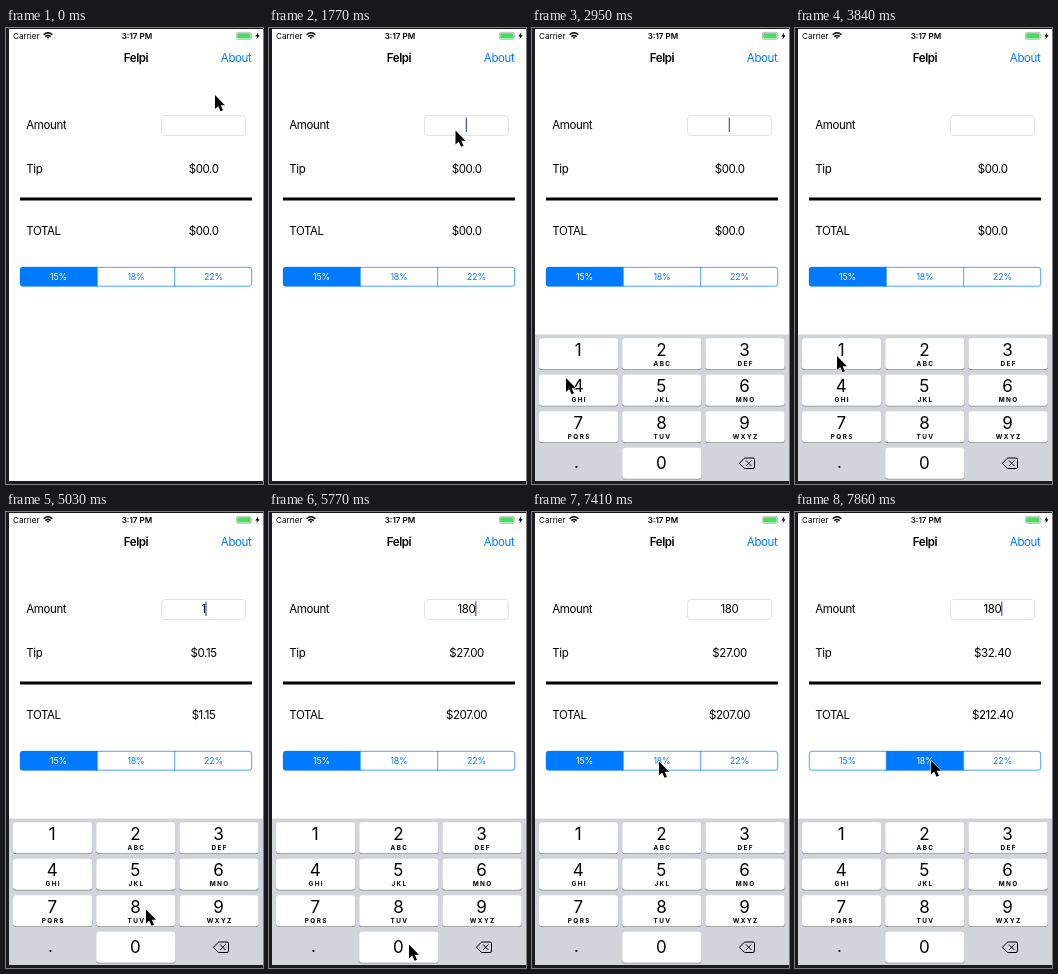
An HTML page for the animation above (8 s loop, 257 by 456 pixels).

```html
<!DOCTYPE html>
<html lang="en">
<head>
<meta charset="utf-8">
<title>Tip calculator</title>
<style>
  html, body { margin: 0; width: 100%; height: 100%; overflow: hidden; background: #1b1b1d; }
  svg { display: block; width: 100vw; height: 100vh; }
  text { font: 11.5px Inter, Roboto, sans-serif; letter-spacing: -.4px; fill: #000; }
  .mid { text-anchor: middle; }
  .status { font-size: 8.1px; letter-spacing: 0; }
  .bold { font-weight: 600; }
  .link { fill: #007aff; text-anchor: end; }
  .seg { font-size: 8.8px; letter-spacing: -.2px; text-anchor: middle; }
  .digit { font-size: 17px; letter-spacing: 0; text-anchor: middle; }
  .letters { font-size: 6.4px; font-weight: 700; letter-spacing: 1.4px; text-anchor: middle; }
</style>
</head>
<body>
<svg viewBox="0 0 257 456" preserveAspectRatio="none">
  <defs>
    <clipPath id="screen"><rect x="3" y="1" width="254" height="452"/></clipPath>
    <clipPath id="segClip"><rect x="14" y="239" width="232" height="19.5" rx="2.7"/></clipPath>
  </defs>
  <g clip-path="url(#screen)">
    <rect x="3" y="1" width="254" height="452" fill="#fff"/>

    <text class="status" x="7" y="11">Carrier</text>
    <g fill="none" stroke="#000" stroke-width="1.5">
      <path d="M37.6 6.7Q42 2.900 46.400 6.700M39.300 8.600Q42 6.300 44.700 8.600"/>
      <path d="M40.700 9.500L42 11L43.300 9.500Q42 8.500 40.700 9.500Z" fill="#000" stroke="none"/>
    </g>
    <text class="status bold mid" x="131" y="11">3:17 PM</text>
    <rect x="230.400" y="4.400" width="15" height="7" rx="1.500" fill="#fff" stroke="#999" stroke-width=".6"/>
    <rect x="231.200" y="5.200" width="13.400" height="5.400" rx=".8" fill="#4cd964"/>
    <path d="M246.300 6.600Q247.300 7.900 246.300 9.200Z" fill="#999"/>
    <path d="M252.300 4.300L249.300 8.500H251.200L250.500 11.500L253.600 7.200H251.700Z"/>

    <text class="bold mid" x="130" y="34">Felpi</text>
    <text class="link" x="245.300" y="34">About</text>

    <text x="20.300" y="101.200">Amount</text>
    <text x="20.300" y="145.200">Tip</text>
    <text x="20.300" y="207">TOTAL</text>
    <rect x="155.500" y="87.500" width="84" height="20" rx="3.500" fill="#fff" stroke="#dcdcdc" stroke-width=".8"/>
    <text id="amount" class="mid" x="197.500" y="101.200"></text>
    <rect id="caret" y="89.500" width="1.300" height="14.500" fill="#4a5fd0"/>
    <text id="tip" class="mid" x="197.600" y="144.600"></text>
    <text id="total" class="mid" x="197.600" y="207"></text>
    <rect x="14" y="169.500" width="232" height="3"/>

    <g clip-path="url(#segClip)" id="segments"></g>
    <path d="M91.300 239V258.500M168.700 239V258.500" stroke="#007aff" stroke-width=".7"/>
    <rect x="14.300" y="239.300" width="231.400" height="18.900" rx="2.600" fill="none" stroke="#007aff" stroke-width=".7"/>

    <g id="keyboard">
      <rect x="3" y="306.500" width="254" height="147" fill="#d1d5db"/>
      <g id="keys"></g>
      <text class="digit" x="44.500" y="439.500">.</text>
      <g fill="none" stroke="#000" stroke-width="1">
        <path d="M207.400 435.300L212 430.500Q212.500 430 213.200 430H221Q222.500 430 222.500 431.500V439Q222.500 440.500 221 440.500H213.200Q212.500 440.500 212 440Z"/>
        <path d="M214 432.500L219.400 438M219.400 432.500L214 438"/>
      </g>
    </g>
  </g>
  <path id="cursor" d="M0 0V14L3.200 11.100L5.500 16.300L8 15.200L5.700 10.200H10Z" stroke="#fff" stroke-width="1" paint-order="stroke"/>
</svg>
<script>
const LOOP = 8000, STEP = 148.2, LAST = 53;
const $ = id => document.getElementById(id);

function add(parent, tag, attrs, label) {
  const el = document.createElementNS('http://www.w3.org/2000/svg', tag);
  for (const name in attrs) el.setAttribute(name, attrs[name]);
  if (label) el.textContent = label;
  return parent.appendChild(el);
}

const segments = [15, 18, 22].map((rate, i) => ({
  rate,
  box: add($('segments'), 'rect', { x: 14 + i * 77.33, y: 239, width: 77.33, height: 19.5 }),
  label: add($('segments'), 'text', { class: 'seg', x: 52.5 + i * 77.5, y: 252 }, rate + '%')
}));

const LETTERS = ['', 'ABC', 'DEF', 'GHI', 'JKL', 'MNO', 'PQRS', 'TUV', 'WXYZ'];
const keys = {};
function addKey(digit, col, row, letters) {
  const x = 7 + col * 83.2, y = 310.3 + row * 36.5, size = { x, width: 79.2, height: 31, rx: 3.2 };
  add($('keys'), 'rect', { ...size, y: y + .8, fill: '#898c91' });
  keys[digit] = add($('keys'), 'rect', { ...size, y });
  const cx = x + 39.6;
  add($('keys'), 'text', { class: 'digit', x: cx - .4, y: y + (digit ? 17.3 : 21.4) }, String(digit));
  if (letters) add($('keys'), 'text', { class: 'letters', x: cx + .7, y: y + 27.2 }, letters);
}
LETTERS.forEach((letters, i) => addKey(i + 1, i % 3, Math.floor(i / 3), letters));
addKey(0, 1, 3);

// Pointer stops: [step, x, y]
const PATH = [
  [0, 209, 67], [1, 205, 71], [2, 193, 85], [3, 186, 94], [7, 186, 94], [8, 185.5, 101],
  [10, 186, 105], [12, 186.5, 102.5], [15, 186.5, 102.5], [17, 120, 225], [19, 34, 350], [20, 27, 360.5],
  [23, 27, 357], [25, 42, 328], [30, 45, 326], [31, 114, 438], [32, 136, 408], [34, 140, 397.5],
  [35, 140, 397.5], [36, 140, 432.5], [41, 140, 432.5], [43, 138, 370], [45, 129, 258],
  [46, 127, 249], [50, 127, 249.5], [51, 131, 250], [52, 136, 248.5], [53, 136, 248.5]
];
const CARET_TOGGLES = [5, 8, 11, 15, 18, 22, 26, 29, 31, 41, 44, 47, 51];

function pointerAt(step) {
  const i = Math.max(1, PATH.findIndex(p => p[0] >= step));
  const [s0, x0, y0] = PATH[i - 1], [s1, x1, y1] = PATH[i];
  const u = (step - s0) / (s1 - s0);
  return [x0 + (x1 - x0) * u, y0 + (y1 - y0) * u];
}

const typedAt = step => step < 31 ? '' : step < 36 ? '1' : step < 38 ? '18' : '180';
const pressedAt = step => step === 29 || step === 30 ? 1 : step === 35 ? 8 : step === 36 || step === 37 ? 0 : -1;
const money = value => value ? '$' + value.toFixed(2) : '$00.0';

function draw(step) {
  const typed = typedAt(step), rate = step < 52 ? 15 : 18;
  const bill = step < 32 ? 0 : Number(typed), tip = bill * rate / 100;
  $('amount').textContent = typed;
  $('tip').textContent = money(tip);
  $('total').textContent = money(bill + tip);

  const half = typed ? $('amount').getComputedTextLength() / 2 : -.5;
  $('caret').setAttribute('x', 197.2 + half);
  const lit = CARET_TOGGLES.filter(s => s <= step).length % 2;
  $('caret').setAttribute('opacity', lit);

  for (const s of segments) {
    const on = s.rate === rate;
    s.box.style.fill = on ? '#007aff' : '#fff';
    s.label.style.fill = on ? '#fff' : '#007aff';
  }

  const pressed = pressedAt(step);
  for (const digit in keys) keys[digit].style.fill = Number(digit) === pressed ? '#b4b9c2' : '#fff';
  const hidden = Math.min(1, Math.max(0, (18.3 - step) / 3));
  $('keyboard').setAttribute('transform', `translate(0 ${148 * hidden * hidden})`);

  $('cursor').setAttribute('transform', `translate(${pointerAt(step)})`);
}

const start = performance.now();
function tick() {
  const t = (performance.now() - start) % LOOP;
  draw(Math.min(LAST, Math.floor((t + 10) / STEP)));
  requestAnimationFrame(tick);
}
tick();
</script>
</body>
</html>
```
